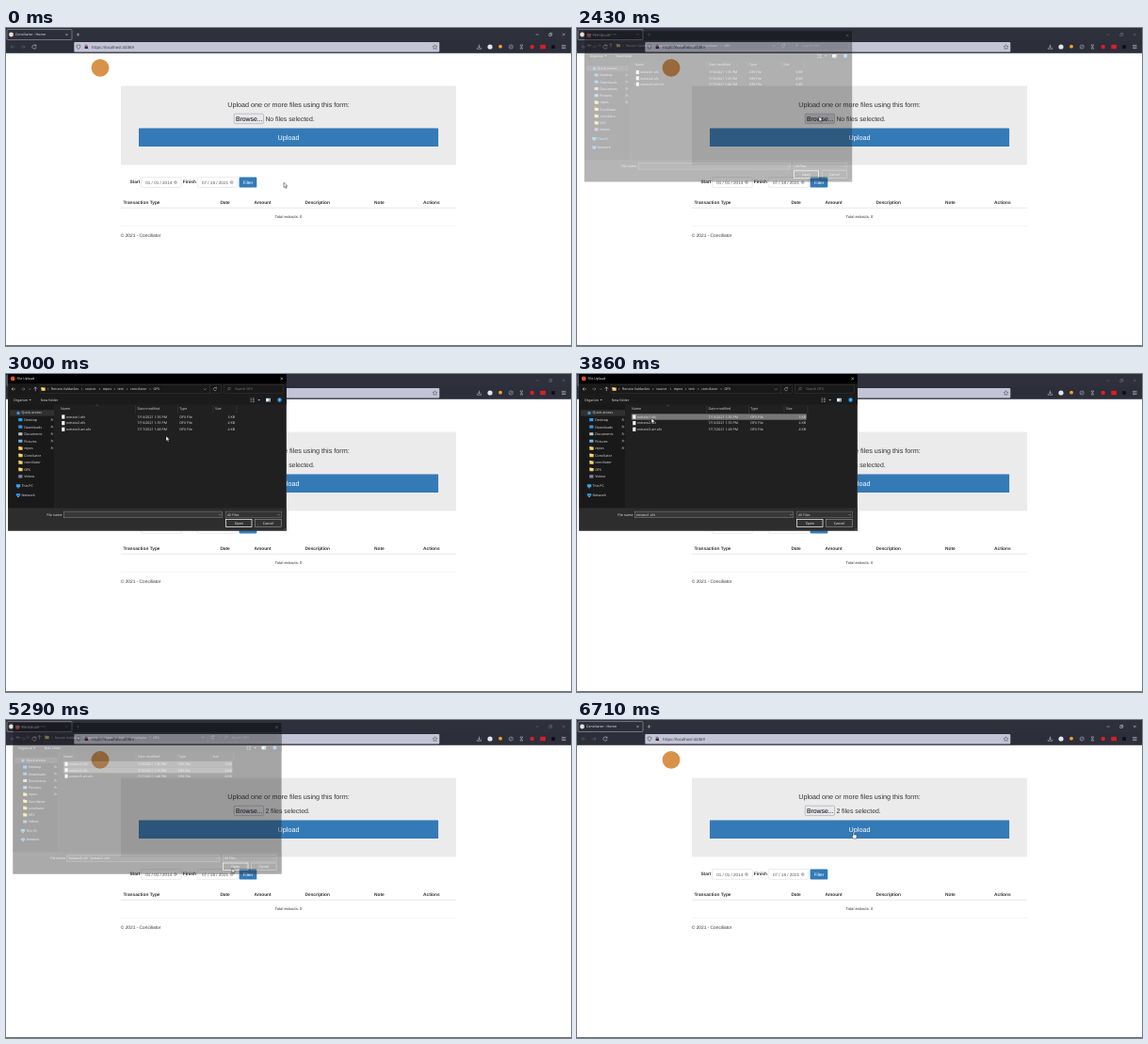
Recreate the animation shown at these times as an HTML page. Size 600 by 338 pixels, loop 8000 ms.

```html
<!DOCTYPE html>
<html lang="en">
<head>
<meta charset="utf-8">
<title>File upload</title>
<style>
html, body { margin: 0; width: 100%; height: 100%; overflow: hidden; background: #fff; }
svg { display: block; width: 600px; height: 338px; }
text { text-rendering: geometricPrecision; white-space: pre; }
.ui { font-family: "Open Sans", "Noto Sans", sans-serif; }
.web { font-family: "Liberation Sans", Arial, sans-serif; }
</style>
</head>
<body>
<svg id="stage" viewBox="0 0 600 338" xmlns="http://www.w3.org/2000/svg"></svg>
<script>
const LOOP = 8000, FPS = 7;
const NS = 'http://www.w3.org/2000/svg';
const stage = document.getElementById('stage');

function el(parent, tag, attrs, text) {
  const e = document.createElementNS(NS, tag);
  for (const k in attrs) e.setAttribute(k, attrs[k]);
  if (text !== undefined) e.textContent = text;
  parent.appendChild(e);
  return e;
}
const group = (p, attrs = {}) => el(p, 'g', attrs);
const rect = (p, x, y, x2, y2, fill, more = {}) =>
  el(p, 'rect', { x, y, width: x2 - x, height: y2 - y, fill, ...more });
const dot = (p, cx, cy, r, fill, more = {}) => el(p, 'circle', { cx, cy, r, fill, ...more });
const line = (p, d, stroke, w = 0.5, more = {}) =>
  el(p, 'path', { d, stroke, 'stroke-width': w, fill: 'none', ...more });
const ui = (p, x, y, s, fill = '#e8e8e8', size = 3.6, more = {}) =>
  el(p, 'text', { class: 'ui', x, y, fill, 'font-size': size, ...more }, s);
const web = (p, x, y, s, size = 4.8125, fill = '#333', more = {}) =>
  el(p, 'text', { class: 'web', x, y, fill, 'font-size': size, ...more }, s);
const BOLD = { 'font-weight': 700 }, MID = { 'text-anchor': 'middle' }, END = { 'text-anchor': 'end' };
const edge = (stroke, w = 0.4, rx = 0) => ({ stroke, 'stroke-width': w, rx });

/* ---------- browser window ---------- */
function buildBrowser(g) {
  rect(g, 0, 0, 600, 338, '#fff');
  rect(g, 0, 0, 600, 26.8, '#2c2e3a');
  rect(g, 0, 0, 600, 13.5, '#2e303c');
  rect(g, 1, 1.6, 70, 12.5, '#2c2e3a', edge('#a4a6b4', 0.6, 1));
  dot(g, 5.5, 7, 2.4, '#ece2d0');

  const light = '#e4e4ea', dim = '#6c6d78', ink = '#2a2b36';
  const title = group(g);
  ui(title, 10, 8.3, 'Conciliator - Home', '#f2f2f6', 3.7);
  line(title, 'M63.4 5.9l2.2 2.2m0-2.2l-2.2 2.2M74.7 7h3.6M76.5 5.2v3.6', light, 0.45);
  line(title, 'M562.6 7h3M576.7 6.2h2.3v2.3h-2.3zM577.5 6.2v-.8h2.3v2.3h-.8M591 5.6l2.6 2.6m0-2.6l-2.6 2.6', light, 0.45);

  line(g, 'M9.5 20H5.1m1.8-1.8L5.1 20l1.8 1.8M15.8 20h4.4m-1.8-1.8l1.8 1.8-1.8 1.8', dim, 0.5);
  line(g, 'M31.7 18.7a2.1 2.1 0 1 0 .4 1.8M32 17.6v1.5h-1.5', light, 0.5);

  rect(g, 72.3, 15, 460.3, 25.4, '#c3c4d6', { rx: 1 });
  line(g, 'M77 17.8l1.9.6c0 2.2-.5 3.2-1.9 4-1.4-.8-1.9-1.8-1.9-4z', ink, 0.45);
  rect(g, 83.6, 19.6, 87, 22.1, ink, { rx: 0.3 });
  line(g, 'M84.3 19.6v-.7a1 1 0 0 1 2 0v.7', ink, 0.45);
  line(g, 'M83.4 18l4.4 4.4', '#d2304a', 0.45);
  ui(g, 91, 21.5, 'https://localhost:44369', ink, 4.2);
  line(g, 'M455.5 17.7l.75 1.6 1.7.2-1.25 1.2.3 1.7-1.5-.8-1.5.8.3-1.7-1.25-1.2 1.7-.2z', ink, 0.4);

  line(g, 'M502.5 17.6v3.2m-1.4-1.3l1.4 1.4 1.4-1.4M500.3 20.9v1.3h4.4v-1.3', light, 0.5);
  dot(g, 514, 20, 2.6, '#e2e4f0');
  dot(g, 525, 19.7, 1.9, '#f0a030');
  dot(g, 536.2, 20, 2.1, 'none', edge('#c4c5d0', 0.5));
  line(g, 'M534.9 21.4l2.7-2.8', '#c4c5d0', 0.5);
  line(g, 'M545.9 18h3l-3 4h3z', '#c4c5d0', 0.5);
  dot(g, 558.7, 20, 2.2, '#d8202c');
  rect(g, 567.3, 17.8, 573, 22.2, '#d3202b', { rx: 0.5 });
  rect(g, 579.4, 18.2, 582.8, 21.9, '#0c0c11');
  line(g, 'M590 18.4h4.5M590 20h4.5M590 21.6h4.5', light, 0.5);
  return title;
}

/* ---------- web page ---------- */
function dateField(g, x, s) {
  rect(g, x, 158.6, x + 42.7, 169.4, '#fff', edge('#ccc', 0.4, 1.4));
  web(g, x + 4.7, 165.7, s, 4.6, '#555');
  dot(g, x + 36.5, 164.1, 1.4, '#fff', edge('#666', 0.5));
  line(g, `M${x + 35.9} 163.5l1.2 1.2m0-1.2l-1.2 1.2`, '#666', 0.4);
}

function buildPage(g) {
  dot(g, 100, 42.3, 9.4, '#d9924a');
  rect(g, 122, 61.6, 478, 145.5, '#ebebeb');
  web(g, 300, 83.7, 'Upload one or more files using this form:', 7.22, '#333', MID);
  const browse = rect(g, 242.2, 91.2, 273.5, 101.6, '#e9e9ed', edge('#8f8f9d', 0.5, 1.2));
  web(g, 243.9, 98.9, 'Browse...', 6.875, '#000');
  const status = web(g, 275.4, 98.9, '', 6.875);
  rect(g, 141, 106.6, 459.1, 126, '#337ab7', { rx: 0.5 });
  web(g, 300, 118.8, 'Upload', 7.22, '#fff', MID);

  web(g, 131.4, 165.4, 'Start', 4.8125, '#333', BOLD);
  dateField(g, 143.5, '01 / 01 / 2014');
  web(g, 187.8, 165.4, 'Finish', 4.8125, '#333', BOLD);
  dateField(g, 203.2, '07 / 18 / 2021');
  rect(g, 247.6, 158.5, 266.3, 169.5, '#337ab7', { rx: 1.2 });
  web(g, 257, 165.6, 'Filter', 4.8125, '#fff', MID);

  const heads = { 'Transaction Type': 124.4, Date: 227.4, Amount: 263.5, Description: 317.5, Note: 391, Actions: 443 };
  for (const s in heads) web(g, heads[s], 186.5, s, 4.8125, '#333', BOLD);
  rect(g, 122, 190.8, 478, 191.5, '#ddd');
  web(g, 300, 201.8, 'Total extracts: 0', 4.125, '#333', MID);
  rect(g, 122, 210.1, 478, 210.5, '#e8e8e8');
  web(g, 121.8, 221.6, '© 2021 - Conciliator');
  rect(g, 0, 337, 600, 338, '#707070');
  return { browse, status };
}

/* ---------- file dialog ---------- */
const folder = (g, x, y) => {
  rect(g, x - 2, y - 2, x, y, '#e0b040');
  rect(g, x - 2, y - 1.4, x + 2.2, y + 1.8, '#f7d36b', { rx: 0.2 });
};

function buildSidebar(g) {
  rect(g, 2.2, 32.5, 51, 142.5, '#191919');
  rect(g, 4, 38.2, 51, 44.6, '#303030');
  el(g, 'path', { d: 'M13 39.3l.7 1.3 1.5.2-1.1 1.1.3 1.5-1.4-.7-1.4.7.3-1.5-1.1-1.1 1.5-.2z', fill: '#3aa0f0' });
  ui(g, 16.6, 42.3, 'Quick access');
  const items = ['Desktop', 'Downloads', 'Documents', 'Pictures', 'repos', 'Conciliator', 'conciliator', 'OFX', 'Videos'];
  const tints = { Desktop: '#2f9be8', Downloads: '#3a8fe0', Documents: '#b9c6d2', Pictures: '#69b5e6', Videos: '#7d86a8' };
  items.forEach((s, i) => {
    const y = 48.8 + i * 7.52;
    if (tints[s]) rect(g, 13.2, y - 1.7, 17.4, y + 1.5, tints[s], { rx: 0.3 });
    else folder(g, 15.4, y);
    ui(g, 19.2, y + 1.3, s);
    if (i < 5) line(g, `M47.4 ${y + 1.2}l1.2-1.2m-.9-.9l1.8 1.8m-.9-2.4l1.5 1.5-.8.3-.9-.9z`, '#c8c8c8', 0.4);
  });
  rect(g, 10.8, 117.3, 15.2, 120.2, '#35a7e8', { rx: 0.3 });
  rect(g, 12, 120.6, 14, 121.2, '#9fd2f0');
  ui(g, 16.6, 120.3, 'This PC');
  rect(g, 10.8, 127, 15.2, 129.8, '#2f8fd8', { rx: 0.3 });
  rect(g, 12, 130.1, 14, 130.8, '#9fd2f0');
  ui(g, 16.6, 130.2, 'Network');
}

function buildDialog(g) {
  rect(g, 2.2, 0, 297.8, 166.5, '#202020', edge('#4a4a4a', 0.4));
  rect(g, 2.2, 0, 297.8, 10.4, '#000');
  dot(g, 7.2, 4.9, 2.4, '#e8503a');
  ui(g, 11.5, 6.2, 'File Upload', '#fff');
  line(g, 'M291.4 3.6l2.6 2.6m0-2.6l-2.6 2.6', '#fff', 0.45);

  rect(g, 2.2, 10.4, 297.8, 22, '#191919');
  line(g, 'M10 16H6m1.6-1.6L6 16l1.6 1.6', '#e8e8e8', 0.5);
  line(g, 'M16 16h4m-1.6-1.6L20 16l-1.6 1.6', '#8a8a8a', 0.5);
  line(g, 'M24.3 15.5l1 1 1-1', '#bbb', 0.45);
  line(g, 'M31.3 18.2v-4.3m-1.7 1.7l1.7-1.7 1.7 1.7', '#e8e8e8', 0.55);
  rect(g, 36, 11.6, 228.8, 20.8, '#191919', edge('#484848', 0.35));
  rect(g, 216.5, 11.6, 216.85, 20.8, '#484848');
  folder(g, 39.5, 16);
  const path = { 'Renato Valdarães': 48, source: 84, repos: 102.7, test: 118.6, conciliator: 132, OFX: 156.4 };
  for (const s in path) {
    line(g, `M${path[s] - 3.8} 15l1 1-1 1`, '#ccc', 0.4);
    ui(g, path[s], 17.3, s);
  }
  line(g, 'M210 15.5l1.3 1.3 1.3-1.3', '#ccc', 0.45);
  line(g, 'M223.4 15a1.7 1.7 0 1 0 .3 1.5M223.7 13.8v1.3h-1.3', '#ccc', 0.45);
  rect(g, 231.5, 11.6, 294.3, 20.8, '#191919', edge('#484848', 0.35));
  dot(g, 237.2, 15.4, 1.2, 'none', edge('#999', 0.4));
  line(g, 'M236.3 16.3l-1.3 1.4', '#999', 0.4);
  ui(g, 243, 17.3, 'Search OFX', '#808080');

  rect(g, 2.2, 22, 297.8, 32.5, '#1b1b1b');
  ui(g, 8, 28.7, 'Organize');
  el(g, 'path', { d: 'M24.5 26.9h2.4l-1.2 1.3z', fill: '#ccc' });
  ui(g, 36.8, 28.7, 'New folder');
  line(g, 'M259.5 26h1.4m-1.4 1.7h1.4m-1.4 1.7h1.4M261.8 26h2m-2 1.7h2m-2 1.7h2', '#ddd', 0.55);
  el(g, 'path', { d: 'M267.5 27.1h2.4l-1.2 1.3z', fill: '#ccc' });
  rect(g, 276, 25.8, 280.8, 29.4, '#e4e4e4');
  rect(g, 279, 26.5, 280.4, 29, '#4aa3df');
  dot(g, 290.5, 27.6, 2.3, '#1f8be0');
  ui(g, 290.5, 28.9, '?', '#fff', 3.6, { ...BOLD, ...MID });

  buildSidebar(g);
  line(g, 'M95.6 33.9l1.2-1 1.2 1', '#999', 0.35);
  const cols = { Name: 58, 'Date modified': 139.5, Type: 184.3, Size: 222 };
  for (const s in cols) ui(g, cols[s], 38.3, s, '#dcdcdc');
  for (const x of [137.4, 182, 219.8, 244.8]) rect(g, x, 33.5, x + 0.35, 41.5, '#505050');

  const files = [
    ['extrato1.ofx', '7/16/2021 1:35 PM', '3 KB'],
    ['extrato2.ofx', '7/16/2021 1:35 PM', '4 KB'],
    ['extrato3-art.ofx', '7/17/2021 1:48 PM', '4 KB']
  ];
  const rows = files.map(([name, date, size], i) => {
    const y = 45.5 + i * 6.65;
    const bar = rect(g, 57.8, y - 3.1, 243.7, y + 3.2, 'none');
    rect(g, 59.2, y - 2.1, 62.4, y + 2.1, '#f4f4f4');
    ui(g, 64, y + 1.3, name);
    ui(g, 139.5, y + 1.3, date);
    ui(g, 184.3, y + 1.3, 'OFX File');
    ui(g, 243, y + 1.3, size, '#e8e8e8', 3.6, END);
    return bar;
  });

  rect(g, 2.4, 142.5, 297.6, 166.3, '#2d2d2d');
  ui(g, 60.3, 150.7, 'File name:', '#e8e8e8', 3.6, END);
  rect(g, 61.6, 146.1, 229.8, 152.8, '#383838', edge('#9b9b9b', 0.4));
  const name = ui(g, 62.8, 150.7, '');
  line(g, 'M226 149l1.2 1.2 1.2-1.2', '#ccc', 0.4);
  rect(g, 233.3, 146.1, 292.4, 152.8, '#333', edge('#8a8a8a', 0.4));
  ui(g, 235, 150.7, 'All Files');
  line(g, 'M288.5 149l1.2 1.2 1.2-1.2', '#ccc', 0.4);
  rect(g, 233.6, 154.6, 261, 162.5, '#333', edge('#fff', 0.7));
  ui(g, 247.3, 159.9, 'Open', '#fff', 3.6, MID);
  rect(g, 264.6, 154.6, 292.2, 162.5, '#333', edge('#b0b0b0', 0.5));
  ui(g, 278.4, 159.9, 'Cancel', '#fff', 3.6, MID);
  line(g, 'M295.3 165.7l1.7-1.7M296.3 165.7l.7-.7', '#999', 0.35);
  return { rows, name };
}

/* ---------- scene ---------- */
const title = buildBrowser(group(stage));
const page = buildPage(group(stage));
const dialogBox = group(stage);
const dialog = buildDialog(dialogBox);
const outline = { fill: '#fff', stroke: '#111', 'stroke-width': 0.45, 'stroke-linejoin': 'round' };
const arrow = el(stage, 'path', { d: 'M0 0v5.3l1.25-1.15.85 1.95.95-.4-.85-1.9h1.7z', ...outline });
const hand = el(stage, 'path', {
  d: 'M-.6 .4q.6-.8 1.1 0v2l2.4.6q.8.3.7 1.2l-.5 2.6h-3.3l-1.9-2.3q.3-1 1.5-.2z', ...outline
});

/* pointer track: step, x, y */
const track = [
  [0, 295, 164.3], [8, 295, 164.3], [9, 300.3, 142.4], [10, 305, 121], [11, 297, 107],
  [12, 278, 98], [14, 257, 94], [19, 257, 94], [21, 170, 66], [23, 90, 49],
  [27, 79, 47], [29, 80, 51], [30, 92, 54], [31, 128, 67], [33, 212, 143],
  [35, 240, 157.4], [37, 240, 157.4], [38, 243, 157.3], [40, 274, 132], [42, 294, 120],
  [43, 297, 119], [45, 295, 118.2], [47, 293.6, 119.2], [56, 293.6, 119.2]
];

function pointer(n) {
  let i = 1;
  while (i < track.length - 1 && track[i][0] < n) i++;
  const [a, ax, ay] = track[i - 1], [b, bx, by] = track[i];
  const k = (n - a) / (b - a);
  return [ax + (bx - ax) * k, ay + (by - ay) * k];
}

function dialogAlpha(n) {
  if (n < 17 || n > 37) return 0;
  if (n === 37) return 0.4;
  return n === 17 ? 0.35 : n === 18 ? 0.82 : 1;
}

function draw(ms) {
  const n = Math.min(55, Math.floor((ms + 5) * FPS / 1000));
  const [x, y] = pointer(n);
  const alpha = dialogAlpha(n), open = n >= 16 && n < 38;

  title.setAttribute('opacity', open ? 0.4 : 1);
  page.browse.setAttribute('fill', n >= 13 && n < 19 ? '#d0d0d7' : '#e9e9ed');
  page.status.textContent = n < 37 ? 'No files selected.' : '2 files selected.';

  dialogBox.setAttribute('display', alpha ? 'inline' : 'none');
  dialogBox.setAttribute('opacity', alpha);
  const s = 1 - 0.06 * (1 - alpha);
  dialogBox.setAttribute('transform', `translate(150 83) scale(${s}) translate(-150 -83)`);

  const both = n >= 30;
  const first = both ? '#5c5c5c' : n >= 26 ? '#777' : n >= 24 ? '#4d4d4d' : 'none';
  const second = both ? '#666' : n === 29 ? '#4d4d4d' : 'none';
  dialog.rows[0].setAttribute('fill', first);
  dialog.rows[1].setAttribute('fill', second);
  dialog.name.textContent = both ? '"extrato2.ofx" "extrato1.ofx"' : n >= 26 ? 'extrato1.ofx' : '';

  const onUpload = alpha === 0 && x > 140 && x < 460 && y > 106.5 && y < 126;
  arrow.setAttribute('display', onUpload ? 'none' : 'inline');
  hand.setAttribute('display', onUpload ? 'inline' : 'none');
  (onUpload ? hand : arrow).setAttribute('transform', `translate(${x} ${y})`);
}

function tick() {
  draw(performance.now() % LOOP);
  requestAnimationFrame(tick);
}
tick();
</script>
</body>
</html>
```
